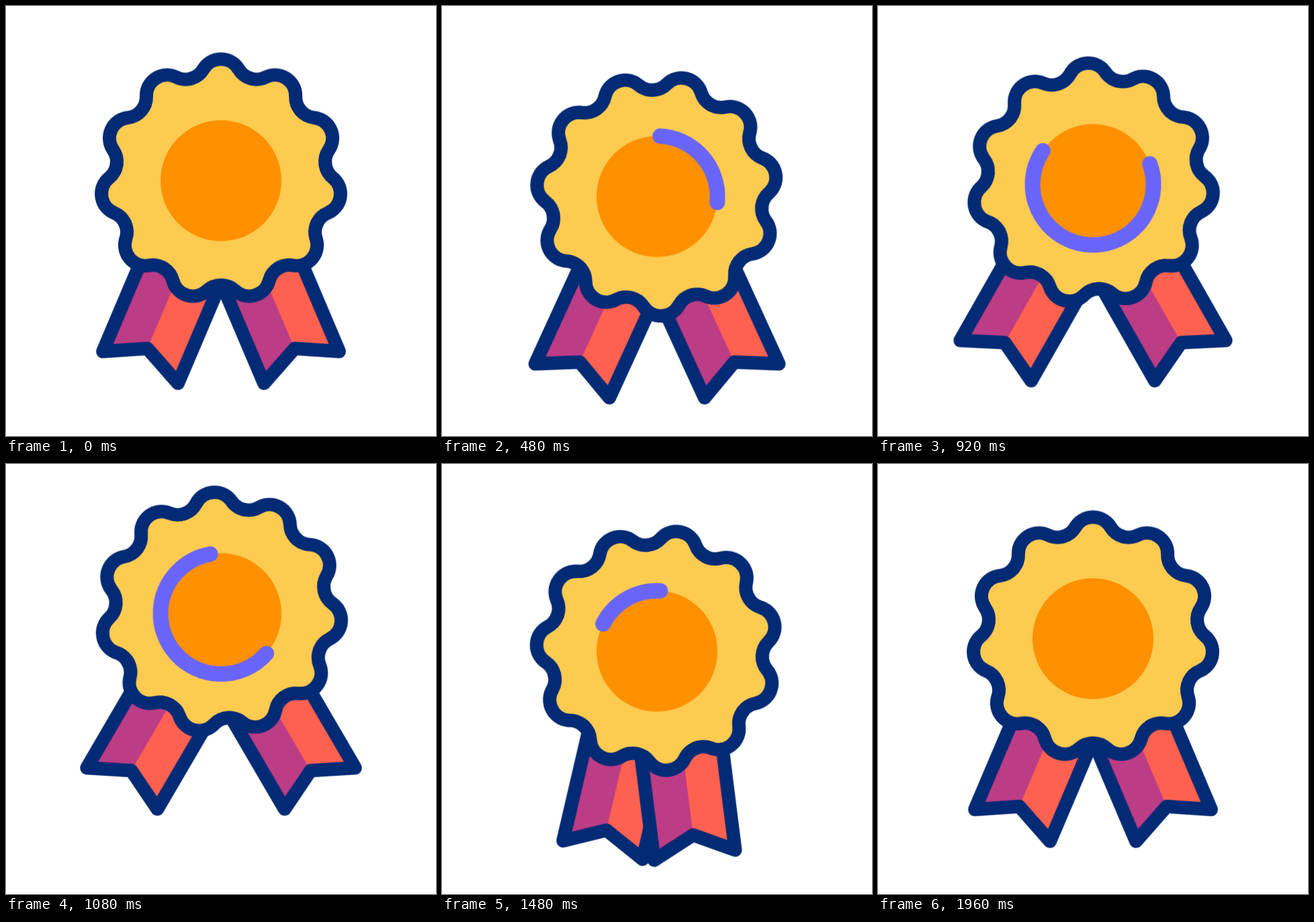
These frames come from a looping animation (640x640 px, 2000 ms). An HTML page without scripts:

```html
<!DOCTYPE html>
<html lang="en">
<head>
<meta charset="utf-8">
<title>Award rosette</title>
<style>
  @property --tail { syntax: "<length>"; inherits: false; initial-value: 0px; }
  @property --head { syntax: "<length>"; inherits: false; initial-value: 0px; }

  html, body { margin: 0; width: 100%; height: 100%; overflow: hidden; background: #fff; }
  svg { display: block; width: 100%; height: 100%; }

  :root {
    --navy: #032a75;
    --plum: #bd3c86;
    --coral: #ff6150;
    --sine: cubic-bezier(.37, 0, .63, 1);
  }

  .bob, .ribbon, .badge { animation: 2s var(--sine) infinite; }
  .line { stroke: var(--navy); stroke-width: 20; stroke-linecap: round; stroke-linejoin: round; }

  .bob { animation-name: bob; }
  @keyframes bob {
    0%, 5% { transform: translate(320px, 260px); animation-timing-function: cubic-bezier(.6, 0, .6, 1); }
    37% { transform: translate(320px, 303.5px); }
    56.25% { transform: translate(320px, 220px); }
    76% { transform: translate(320px, 280px); }
    98%, 100% { transform: translate(320px, 260px); }
  }

  /* --low and --drop set how far each ribbon swings inwards */
  .ribbon { animation-name: swing; }
  .left { --low: -10.9deg; --drop: 63.4px; --inner: var(--coral); --outer: var(--plum); }
  .right { --low: -4.2deg; --drop: 67px; --inner: var(--plum); --outer: var(--coral); }
  @keyframes swing {
    0%, 10% { transform: translate(26.2px, 57px) rotate(-23deg); }
    55%, 56.5% { transform: translate(26.2px, 53.1px) rotate(-30.3deg); }
    79% { transform: translate(26.2px, var(--drop)) rotate(var(--low)); }
    98%, 100% { transform: translate(26.2px, 57px) rotate(-23deg); }
  }

  .badge { animation-name: turn; }
  @keyframes turn {
    0%, 5% { transform: rotate(0deg); }
    44.5%, 49% { transform: rotate(30deg); }
    92%, 100% { transform: rotate(0deg); }
  }

  .arc {
    fill: none;
    stroke: #6a65fa;
    stroke-width: 23;
    stroke-linecap: round;
    stroke-dasharray: calc(var(--head) - var(--tail)) 800px;
    stroke-dashoffset: calc(0px - var(--tail));
    animation: head 2s var(--sine) infinite, tail 2s var(--sine) infinite, show 2s step-end infinite;
  }
  @keyframes head { 0%, 5% { --head: 0px; } 61%, 100% { --head: 360px; } }
  @keyframes tail { 0%, 27.5% { --tail: 0px; } 92.5%, 100% { --tail: 360px; } }
  @keyframes show { 0% { opacity: 0; } 5.2% { opacity: 1; } 92.4%, 100% { opacity: 0; } }
</style>
</head>
<body>
<svg viewBox="0 0 640 640">
  <defs>
    <g id="ribbon">
      <path d="M-60.8 40V240L1.5 210L60.8 240V40Z" style="fill:var(--inner)"/>
      <path d="M60.8 40V240L1.5 210V40Z" style="fill:var(--outer)"/>
      <path class="line" fill="none" d="M-60.8 40V240L1.5 210L60.8 240V40Z"/>
    </g>
    <path id="lobe" d="M-44.2 -150.6A30.7 30.7 0 0 0 -26.4 -164.4A30.7 30.7 0 0 1 26.4 -164.4A30.7 30.7 0 0 0 44.2 -150.6"/>
    <g id="lobes">
      <use href="#lobe"/>
      <use href="#lobe" transform="rotate(32.727)"/>
      <use href="#lobe" transform="rotate(65.455)"/>
      <use href="#lobe" transform="rotate(98.182)"/>
      <use href="#lobe" transform="rotate(130.909)"/>
      <use href="#lobe" transform="rotate(163.636)"/>
      <use href="#lobe" transform="rotate(196.364)"/>
      <use href="#lobe" transform="rotate(229.091)"/>
      <use href="#lobe" transform="rotate(261.818)"/>
      <use href="#lobe" transform="rotate(294.545)"/>
      <use href="#lobe" transform="rotate(327.273)"/>
    </g>
  </defs>

  <g class="bob">
    <g transform="scale(-1 1)">
      <g class="ribbon left"><use href="#ribbon"/></g>
    </g>
    <g class="ribbon right"><use href="#ribbon"/></g>

    <g transform="translate(0 -1.5)">
      <g class="badge" fill="#fdcb50">
        <circle r="154"/>
        <use href="#lobes"/>
        <use href="#lobes" class="line" fill="none"/>
      </g>
    </g>

    <circle r="90" fill="#ff9000"/>
    <circle class="arc" r="90" pathLength="360" transform="rotate(-87)"/>
  </g>
</svg>
</body>
</html>
```
